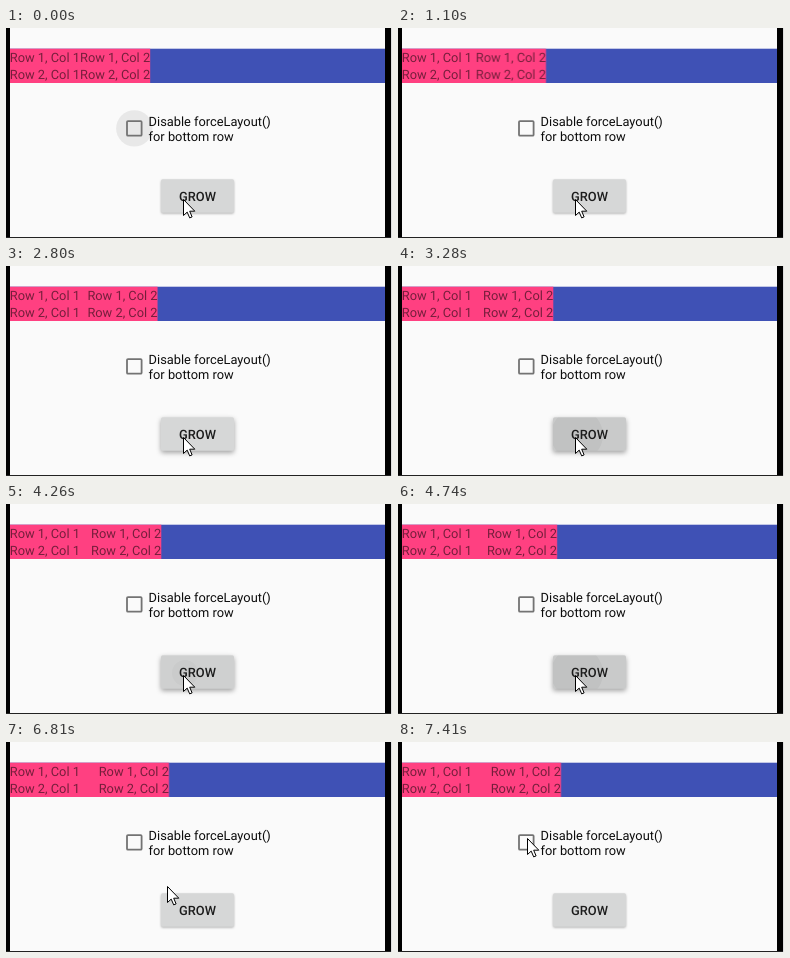
Write an HTML page that moves like this. It is 386x210 px and loops after 8 s.

```html
<!DOCTYPE html>
<html lang="en">
<head>
<meta charset="utf-8">
<title>Grow button demo</title>
<style>
  html, body { margin: 0; width: 100%; height: 100%; overflow: hidden; background: #fafafa; }
  svg { display: block; width: 386px; height: 210px; }
  text { font: 12.83px Roboto, Arial, sans-serif; text-rendering: geometricPrecision; }
  .cell { fill: rgba(0, 0, 0, .54); }
  .label { fill: #0c0c0c; }
  .caption { fill: #1c1c1c; font-weight: 500; text-anchor: middle; }
  .col, .pink, .focus, .button, .shade, .ripple, .cursor {
    animation: 8s step-end infinite;
  }

  /* Each click widens the first column by one step */
  .col, .pink { animation-name: grow; }
  @keyframes grow {
    0%      { transform: translateX(0); }
    9.25%   { transform: translateX(3.7px); }
    24.375% { transform: translateX(7.4px); }
    41%     { transform: translateX(11.1px); }
    59.25%  { transform: translateX(14.9px); }
    77.625%, 100% { transform: translateX(18.7px); }
  }

  .focus { animation-name: focus; }
  @keyframes focus {
    0%    { opacity: .068; }
    6.25% { opacity: .035; }
    7.75%, 100% { opacity: 0; }
  }

  /* Elevation while pressed */
  .button { animation-name: lift; }
  @keyframes lift {
    0%, 10.75%, 28.875%, 44%, 62.25%, 79.125%, 100% {
      filter: drop-shadow(0 1px 1px rgba(0, 0, 0, .28));
    }
    6.25%, 21.375%, 35%, 53.25%, 70% {
      filter: drop-shadow(0 2px 2.5px rgba(0, 0, 0, .36));
    }
  }

  .shade { animation-name: shade; }
  @keyframes shade {
    0%, 13.75%, 28.875%, 44%, 62.25%, 79.125%, 100% { opacity: 0; }
    6.25%, 21.375%, 53.25%, 70% { opacity: .03; }
    9.25%, 24.375%, 41%, 59.25%, 77.625% { opacity: .06; }
    10.75%, 25.875%, 42.5%, 60.75% { opacity: .03; }
  }

  .ripple { animation-name: ripple; }
  @keyframes ripple {
    0%, 13.75%, 28.875%, 35%, 44%, 62.25%, 77.625%, 100% { opacity: 0; transform: scale(.3); }
    6.25%, 21.375%, 53.25%, 70% { opacity: .02; transform: scale(.5); }
    9.25%, 24.375%, 41%, 59.25% { opacity: .04; transform: scale(1); }
    10.75%, 25.875%, 42.5%, 60.75% { opacity: .03; transform: scale(1.5); }
  }

  .cursor { animation-name: travel; }
  @keyframes travel {
    0%      { transform: translate(177px, 171px); }
    82.125% { transform: translate(175px, 167px); }
    83.625% { transform: translate(170px, 158px); }
    85.125% { transform: translate(161px, 144px); }
    86.625% { transform: translate(151px, 128px); }
    88.125% { transform: translate(143px, 115px); }
    89.625% { transform: translate(136px, 105px); }
    91.125% { transform: translate(132px, 99px); }
    92.625%, 100% { transform: translate(129px, 96px); }
  }
</style>
</head>
<body>
<svg viewBox="0 0 386 210">
  <defs>
    <clipPath id="face"><rect x="155" y="151.2" width="73" height="33.5" rx="1.8"/></clipPath>
  </defs>

  <rect width="386" height="210" fill="#fafafa"/>

  <rect x="4" y="20.7" width="375" height="34.3" fill="#3f51b5"/>
  <rect class="pink" x="-60" y="20.7" width="204.2" height="34.3" fill="#ff4081"/>
  <g class="cell">
    <text x="3.8" y="34">Row 1, Col 1</text>
    <text x="3.8" y="51.4">Row 2, Col 1</text>
    <g class="col">
      <text x="74" y="34">Row 1, Col 2</text>
      <text x="74" y="51.4">Row 2, Col 2</text>
    </g>
  </g>

  <circle class="focus" cx="128.3" cy="100.4" r="18.2"/>
  <rect x="121" y="93.1" width="14.6" height="14.6" rx="1" fill="none" stroke="#737373" stroke-width="1.8"/>
  <g class="label">
    <text x="142.6" y="97.8">Disable forceLayout()</text>
    <text x="142.6" y="112.7">for bottom row</text>
  </g>

  <g class="button">
    <rect x="155" y="151.2" width="73" height="33.5" rx="1.8" fill="#d6d7d7"/>
  </g>
  <g clip-path="url(#face)">
    <rect class="shade" x="155" y="151" width="73" height="35"/>
    <g transform="translate(179 169)"><circle class="ripple" r="26"/></g>
  </g>
  <text class="caption" x="191.5" y="172.5">GROW</text>

  <path d="M0 0H4V210H0ZM379 0H385V210H379Z"/>
  <rect y="209" width="386" height="1" fill="#222"/>
  <rect x="385" width="1" height="210" fill="#ddd"/>

  <g class="cursor">
    <path d="M.5 .5V16.5L4.2 13.1L6.7 18.9L9.1 17.9L6.7 12.2H11.8Z" fill="#fff" stroke="#000"/>
  </g>
</svg>
</body>
</html>
```
